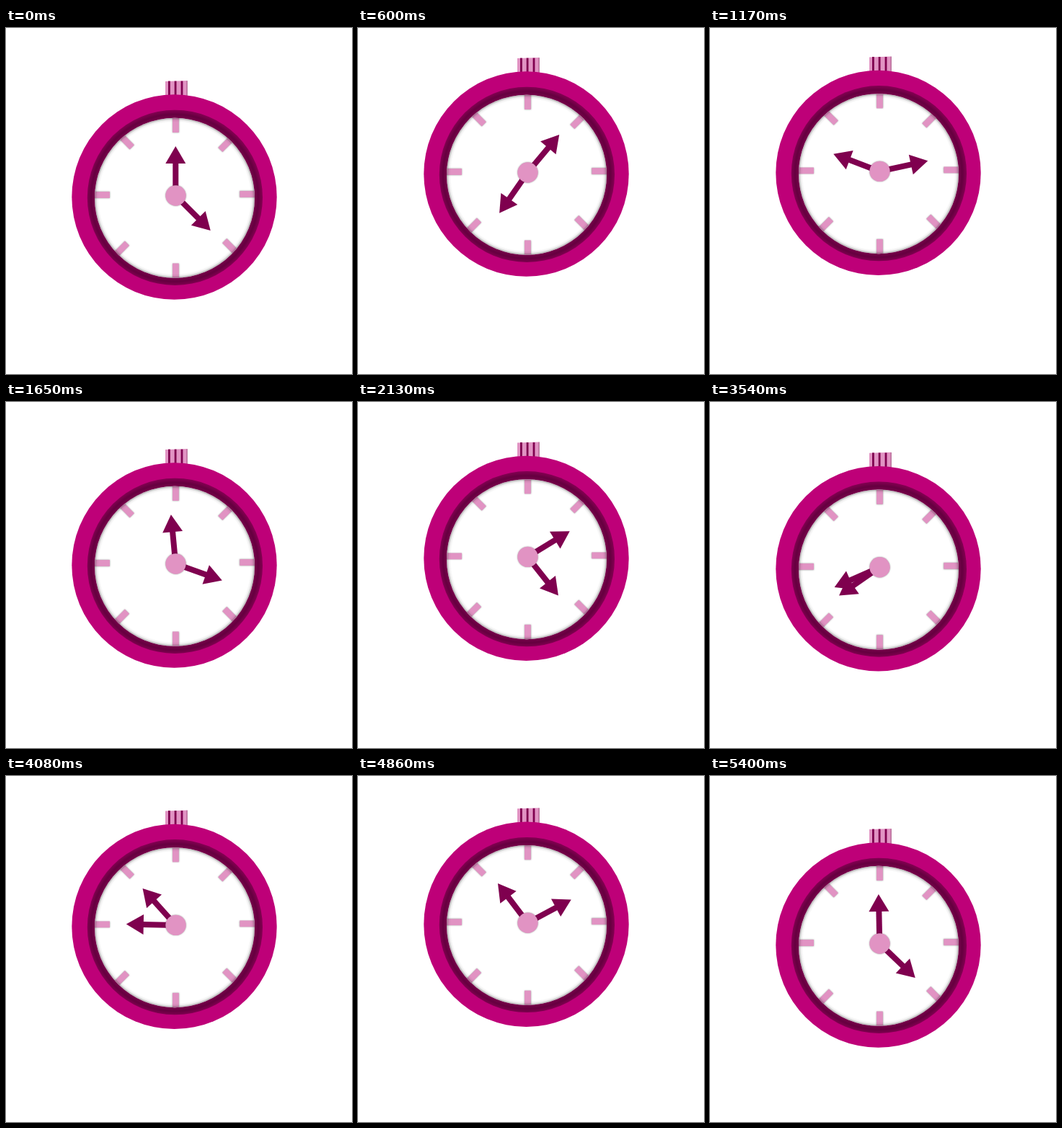
Write an HTML page with a canvas that moves like this. It is 480x480 px and loops after 5430 ms.

```html
<!DOCTYPE html>
<html lang="en">
<head>
<meta charset="utf-8">
<title>Bouncing stopwatch</title>
<style>
  html, body { margin: 0; width: 100%; height: 100%; overflow: hidden; background: #fff; }
  canvas { display: block; width: 480px; height: 480px; }
</style>
</head>
<body>
<canvas id="stage" width="480" height="480"></canvas>
<script>
const ctx = document.getElementById('stage').getContext('2d');
const STEP = 30, STEPS = 181, LAP = 180;
const RIM = '#be0078', DARK = '#7f004f', PINK = '#e193c3';
const FACE = { x: 234, y: 235.8, r: 111 };
const HUB = { x: 235.3, y: 232.5 };

function disc(x, y, r, fill) {
  ctx.beginPath();
  ctx.arc(x, y, r, 0, Math.PI * 2);
  ctx.fillStyle = fill;
  ctx.fill();
}

function shadow(blur, alpha) {
  ctx.shadowBlur = blur;
  ctx.shadowColor = `rgba(0,0,0,${alpha})`;
}

function drawKnob() {
  ctx.fillStyle = PINK;
  ctx.beginPath();
  ctx.moveTo(221, 74);
  ctx.lineTo(251.5, 73);
  ctx.lineTo(251.5, 97);
  ctx.lineTo(221, 97);
  ctx.fill();
  ctx.fillStyle = DARK;
  for (const x of [225, 233.7, 242.6]) ctx.fillRect(x, 73.6, 2.8, 24);
  ctx.fillStyle = '#a0507e';
  ctx.fillRect(250.6, 73.2, 1, 24);
}

function drawCase() {
  disc(233.5, 234.5, 142.2, RIM);
  disc(234.4, 235.3, 121.6, DARK);
  const { x, y, r } = FACE;
  const ring = ctx.createRadialGradient(x, y, r, x, y, r + 10);
  ring.addColorStop(0, 'rgba(70,0,44,0.15)');
  ring.addColorStop(0.5, 'rgba(70,0,44,0.45)');
  ring.addColorStop(1, 'rgba(70,0,44,0)');
  disc(x, y, r + 10, ring);
  disc(x, y, r, '#fff');
}

function drawTicks() {
  const { x, y, r } = FACE;
  ctx.save();
  ctx.beginPath();
  ctx.arc(x, y, r, 0, Math.PI * 2);
  ctx.clip();
  shadow(2, 0.4);
  // inner end and outward direction
  const ticks = [
    [235.4, 145, 0, -1], [235.4, 326.5, 0, 1],
    [144, 231.5, -1, 0], [324.3, 230.5, 1, 0],
    [174.8, 165.3, -1, -1], [297.3, 169, 1, -1],
    [168, 298.7, -1, 1], [303.2, 295.2, 1, 1]
  ];
  for (const [tx, ty, dx, dy] of ticks) {
    ctx.save();
    ctx.translate(tx, ty);
    ctx.rotate(Math.atan2(dy, dx));
    ctx.fillStyle = PINK;
    ctx.fillRect(0, -4.4, dx && dy ? 20 : 24, 8.8);
    ctx.restore();
  }
  shadow(0, 0);
  const edge = ctx.createRadialGradient(x, y, r - 6, x, y, r);
  edge.addColorStop(0, 'rgba(0,0,0,0)');
  edge.addColorStop(0.5, 'rgba(0,0,0,0.06)');
  edge.addColorStop(1, 'rgba(0,0,0,0.32)');
  disc(x, y, r, edge);
  ctx.restore();
}

function drawHand(deg) {
  ctx.save();
  ctx.translate(HUB.x, HUB.y);
  ctx.rotate(deg * Math.PI / 180);
  ctx.fillStyle = DARK;
  ctx.fillRect(-4, -46, 8, 46);
  ctx.beginPath();
  ctx.moveTo(0, -68.5);
  ctx.lineTo(14, -44.5);
  ctx.lineTo(-14, -44.5);
  ctx.fill();
  ctx.restore();
}

function draw(step) {
  const phase = (step % 60) / 30;
  const lift = 48 * (phase < 1 ? phase : 2 - phase);
  const lap = step / LAP;

  ctx.fillStyle = '#fff';
  ctx.fillRect(0, 0, 480, 480);
  ctx.save();
  ctx.translate(0, -lift);
  drawKnob();
  drawCase();
  drawTicks();
  drawHand(358.8 * lap);
  drawHand(135 + 718.8 * lap);
  shadow(2, 0.4);
  disc(HUB.x + 0.2, HUB.y, 14.2, PINK);
  ctx.restore();
}

let start = null;
function tick(now) {
  if (start === null) start = now;
  draw(Math.floor((now - start) / STEP) % STEPS);
  requestAnimationFrame(tick);
}
draw(0);
requestAnimationFrame(tick);
</script>
</body>
</html>
```
